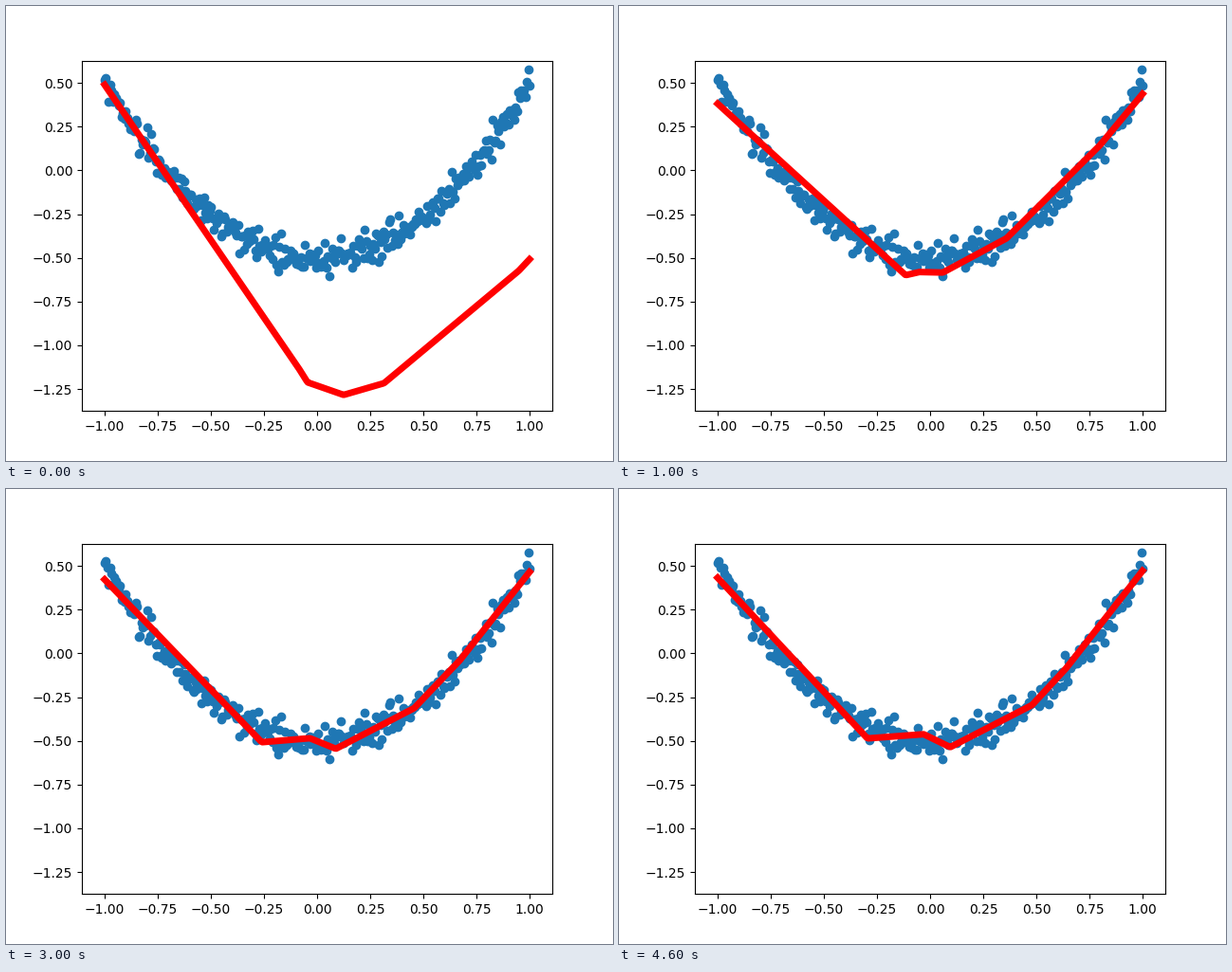
A matplotlib script for the animation above (5000 ms loop, 640 by 480 pixels).

```python
import numpy as np
import matplotlib.pyplot as plt
from matplotlib.animation import FuncAnimation

STEPS = 5

# Corners of the fitted curve: untrained, after one step, and settled.
UNTRAINED = np.array([(-1, .49), (-.09, -1.125), (-.045, -1.212),
                      (.125, -1.284), (.315, -1.217), (.95, -.573),
                      (1, -.508)])
EARLY = np.array([(-1, .382), (-.115, -.599), (-.05, -.581), (.06, -.584),
                  (.36, -.388), (.8, .145), (1, .438)])
SETTLED = np.array([(-1, .433), (-.295, -.486), (-.03, -.462), (.095, -.536),
                    (.48, -.295), (.64, -.085), (1, .473)])


def corners(step):
    """The first step is a big jump, then the curve settles ever slower."""
    if step == 0:
        return UNTRAINED
    t = (step - 1) / (STEPS - 2)
    eased = 1 - (1 - t) ** 1.5
    return EARLY + (SETTLED - EARLY) * eased


rng = np.random.default_rng(1)
x = np.linspace(-1, 1, 300)
noise = np.clip(rng.normal(0, 0.05, x.size), -0.11, 0.11)
y = x**2 - 0.5 + noise

fig, ax = plt.subplots(figsize=(6.4, 4.8), dpi=100)
ax.scatter(x, y)
line, = ax.plot([], [], "r-", lw=5)
ax.set(xlim=(-1.1071, 1.1071), ylim=(-1.3758, 0.6285))


def update(step):
    line.set_data(x, np.interp(x, *corners(step).T))
    return line,


anim = FuncAnimation(fig, update, frames=STEPS, interval=1000,
                     repeat=True, repeat_delay=0)
plt.show()
```
